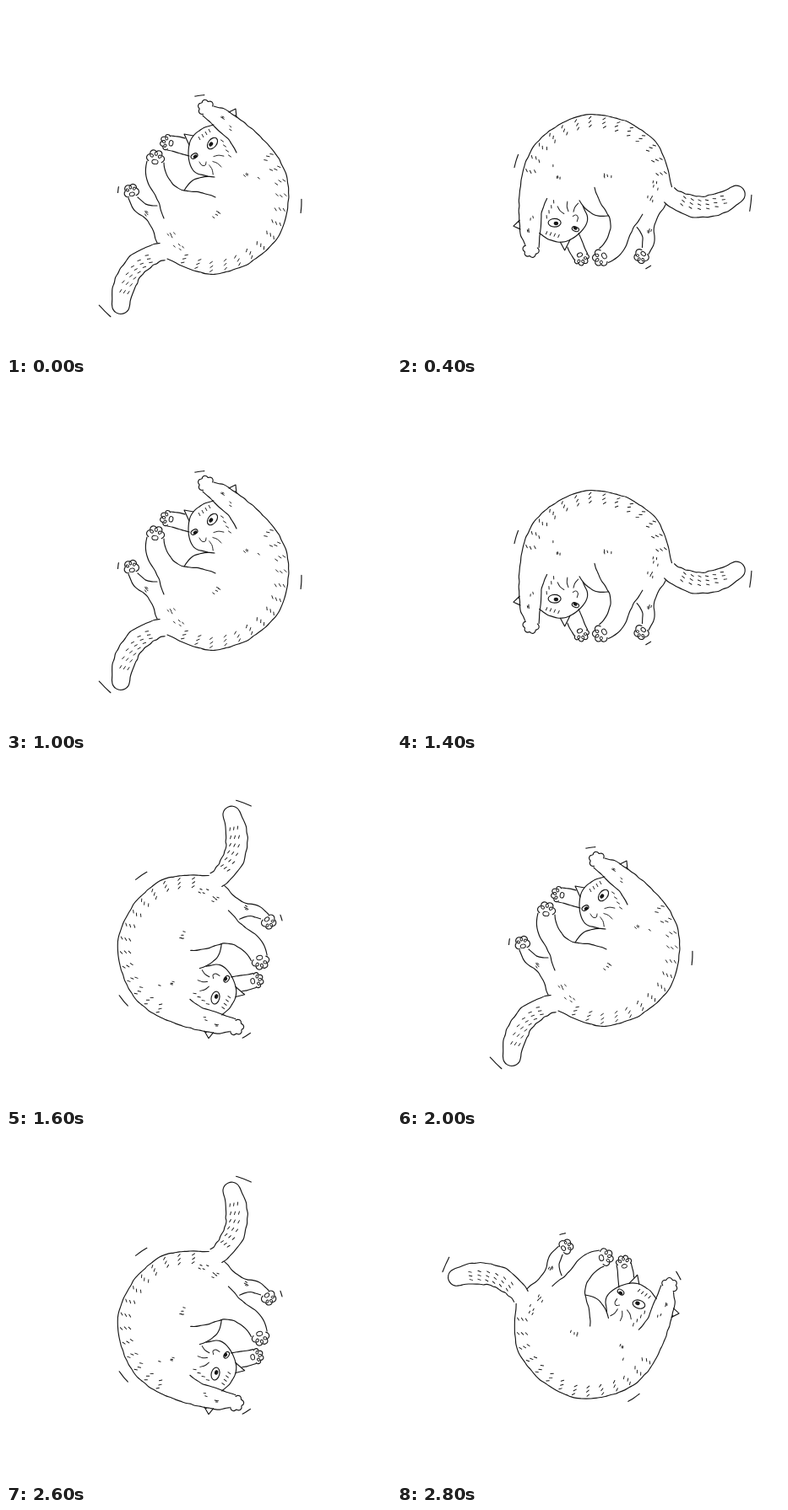
An HTML page that plays this animation: 456x413 px, repeating every 3000 ms.

```html
<!DOCTYPE html>
<html lang="en">
<head>
<meta charset="utf-8">
<title>Rolling cat</title>
<style>
  html, body { margin: 0; width: 100%; height: 100%; overflow: hidden; background: #fff; }
  svg { display: block; width: 456px; height: 413px; }
  path, ellipse { fill: none; stroke: #151515; stroke-width: 1.15; stroke-linecap: round; stroke-linejoin: round; }
  .thin { stroke-width: .95; }
  .solid { fill: #151515; }
</style>
</head>
<body>
<svg viewBox="0 0 456 413"><g id="cat"></g></svg>
<script>
const STEP = 200;
const MIDDLE = [247, 232];
const cat = document.getElementById('cat');

let seed = 7;
const random = () => (seed = seed * 16807 % 2147483647) / 2147483647;
const jitter = amount => (random() * 2 - 1) * amount;
const rad = degrees => degrees * Math.PI / 180;
const polar = ([x, y], r, angle) => [x + r * Math.cos(angle), y + r * Math.sin(angle)];
const points = text => text.split(' ').map(pair => pair.split(',').map(Number));

function add(tag, attrs, parent = cat) {
  const node = document.createElementNS('http://www.w3.org/2000/svg', tag);
  for (const key in attrs) node.setAttribute(key, attrs[key]);
  return parent.appendChild(node);
}

// Smooth path through all points.
function smooth(p) {
  let d = `M${p[0]}`;
  for (let i = 0; i < p.length - 1; i++) {
    const a = p[i - 1] || p[i], b = p[i], c = p[i + 1], e = p[i + 2] || c;
    const c1 = b.map((v, k) => v + (c[k] - a[k]) / 6);
    const c2 = c.map((v, k) => v - (e[k] - b[k]) / 6);
    d += `C${c1} ${c2} ${c}`;
  }
  return d;
}

const curve = (p, cls = '', parent = cat) => add('path', { d: smooth(p), class: cls }, parent);

// Evenly spaced points of a path, both ends included.
function sample(path, count) {
  const length = path.getTotalLength();
  return Array.from({ length: count + 1 }, (_, i) => {
    const { x, y } = path.getPointAtLength(length * i / count);
    return [x, y];
  });
}

// Curve with the small unevenness of a furry outline.
function furry(text, amount = .5) {
  const path = curve(points(text));
  const p = sample(path, Math.round(path.getTotalLength() / 6));
  const rough = p.map((q, i) => i && i < p.length - 1 ? q.map(v => v + jitter(amount)) : q);
  path.setAttribute('d', smooth(rough));
  return path;
}

function oval(cx, cy, rx, ry, turn = 0, cls = 'thin') {
  add('ellipse', { cx, cy, rx, ry, class: cls, transform: `rotate(${turn} ${cx} ${cy})` });
}

function tick(at, angle, length = 3.6) {
  add('path', { d: `M${polar(at, -length / 2, angle)}L${polar(at, length / 2, angle)}`, class: 'thin' });
}

function scatter(x, y, spread, count, angle) {
  for (let i = 0; i < count; i++) tick([x + jitter(spread), y + jitter(spread)], angle + jitter(.2), 2.6);
}

// Four round toes between two wrist angles, with optional pads.
function paw(center, radius, from, to, pads = true) {
  const outline = [];
  for (let i = 0; i <= 16; i++) {
    const k = i / 16;
    outline.push(polar(center, radius * (.86 + .2 * Math.abs(Math.sin(k * 4 * Math.PI))), rad(from + (to - from) * k)));
  }
  curve(outline);
  if (!pads) return;
  const facing = (from + to) / 2;
  oval(...polar(center, -radius * .4, rad(facing)), radius * .26, radius * .36, facing);
  for (const side of [-58, 0, 58]) {
    oval(...polar(center, radius * .57, rad(facing + side)), radius * .2, radius * .16, facing + side);
  }
}

function drawLimbs() {
  // near arm
  paw([237, 121], 9.3, 115, 345, false);
  furry('233,130 242,138 252,148 265,160 273,174');
  // far arm
  paw([192, 162], 9, 95, 290);
  furry('195,154 204,155 212,157', .3);
  furry('191,171 203,174 217,178', .3);
  // near hind leg and belly
  paw([177, 181], 10, 163, 393);
  furry('167,184 165,198 169,212 178,227 183,240 187,252');
  furry('187,186 189,197 198,212 210,219 230,221 248,227');
  furry('211,219 220,208 233,203 247,203', .3);
  // far hind leg
  paw([148.5, 220], 8.5, 113, 400);
  furry('145,228 152,243 166,253 174,267 179,281');
  furry('156,227 165,235 179,237');
}

function drawTail() {
  const bend = [[185, 291], [138, 305], [136, 355]];
  const ring = t => {
    const [x, y] = [0, 1].map(k => (1 - t) ** 2 * bend[0][k] + 2 * t * (1 - t) * bend[1][k] + t * t * bend[2][k]);
    const [dx, dy] = [0, 1].map(k => (1 - t) * (bend[1][k] - bend[0][k]) + t * (bend[2][k] - bend[1][k]));
    return { at: [x, y], angle: Math.atan2(dy, dx), half: 10.5 + 2.5 * Math.sin(Math.PI * t) };
  };
  const upper = [], lower = [], tip = [];
  for (let t = 0; t <= 1; t += .0625) {
    const { at, angle, half } = ring(t);
    upper.push(polar(at, half + jitter(.8), angle + Math.PI / 2));
    lower.unshift(polar(at, half + jitter(.8), angle - Math.PI / 2));
  }
  const end = ring(1);
  for (let a = 60; a >= -60; a -= 30) tip.push(polar(end.at, end.half, end.angle + rad(a)));
  curve([...upper, ...tip, ...lower]);

  for (let t = .2; t < .9; t += .125) {
    const { at, angle, half } = ring(t);
    for (let k = -.6; k <= .6; k += .4) {
      tick(polar(at, half * k, angle + Math.PI / 2), angle + .35);
    }
  }
}

function drawBack() {
  const back = furry('246,119 258,122 272,131 290,145 308,162 324,183 334,210 333,243 326,267 314,284 297,299 276,311 247,318 219,313 191,300');
  for (const [x, y] of sample(back, 19).slice(5, -1)) {
    const inward = Math.atan2(MIDDLE[1] - y, MIDDLE[0] - x);
    for (const depth of [4, 9, 14]) {
      tick(polar([x, y], depth, inward + jitter(.1)), inward + .9);
    }
  }
  // loose hairs on belly, haunch, shoulder, arm and leg
  scatter(248, 245, 6, 4, .5);
  scatter(195, 270, 5, 4, .9);
  scatter(206, 288, 7, 4, .8);
  scatter(291, 196, 10, 4, .6);
  scatter(264, 139, 9, 6, .6);
  scatter(168, 245, 5, 4, .8);
}

function drawHead() {
  furry('246,141 232,146 220,157 216,174 218,188 225,198 239,202', .3);
  add('path', { d: 'M222 154L211 152L217 165M264 126L272 122L273 132' });
  oval(244.5, 163, 7.6, 4.9, 128, '');
  oval(242.8, 164, 2.2, 1.6, 128, 'solid');
  oval(223, 178, 4.3, 2.7, 148, '');
  oval(224, 178.5, 2, 1.3, 148, 'solid');
  curve(points('229,185 232,189 236,189 237,185'), 'thin');
  // whiskers fan out from the cheek
  for (let i = 0; i < 3; i++) {
    const angle = rad(-8 + i * 35), from = polar([236, 180], 10, angle);
    curve([from, polar(from, 6, angle - .1), polar(from, 12, angle + .1)], 'thin');
  }
  for (let i = 0; i < 4; i++) tick([229 + i * 4, 157 - i * 3], 1.1);
  for (let i = 0; i < 4; i++) tick([256 + i * 3, 160 + i * 6], .6);
}

// Motion lines are arcs around the middle: angle, radius, sweep.
const trails = { tail: [135, 184, 6], arm: [-98, 127, 5], paw: [187, 115, 3.5] };

// Place and turn of each pose, its trails, and the angles of trails along the back.
const poses = [
  { at: [247, 232], turn: 0, size: 1, trail: ['tail', 'arm', 'paw'], back: [3] },
  { at: [241, 212], turn: -64, size: .988, trail: ['tail', 'arm', 'paw'], back: [5] },
  { at: [238.5, 213], turn: -128.4, size: .988, trail: ['tail', 'paw'], back: [-35] },
  { at: [217.6, 223.5], turn: 155.6, size: .988, trail: ['tail', 'arm', 'paw'], back: [-15, 80] },
  { at: [223.7, 228.8], turn: 69, size: .988, trail: ['tail', 'arm', 'paw'], back: [-13] }
];

function drawTrails(pose) {
  pose.group = add('g', {});
  const arcs = [...pose.trail.map(name => trails[name]), ...pose.back.map(angle => [angle, 103, 9])];
  for (const [angle, radius, sweep] of arcs) {
    curve([-.5, 0, .5].map(k => polar(MIDDLE, radius, rad(angle + k * sweep))), '', pose.group);
  }
}

drawBack();
drawTail();
drawLimbs();
drawHead();
poses.forEach(drawTrails);

const start = performance.now();
function render(now) {
  const index = Math.floor(Math.max(0, now - start) / STEP) % poses.length;
  const { at, turn, size } = poses[index];
  cat.setAttribute('transform',
    `translate(${at}) rotate(${turn}) scale(${size}) translate(${-MIDDLE[0]} ${-MIDDLE[1]})`);
  poses.forEach((pose, i) => pose.group.setAttribute('visibility', i === index ? 'visible' : 'hidden'));
  requestAnimationFrame(render);
}
render(start);
</script>
</body>
</html>
```
